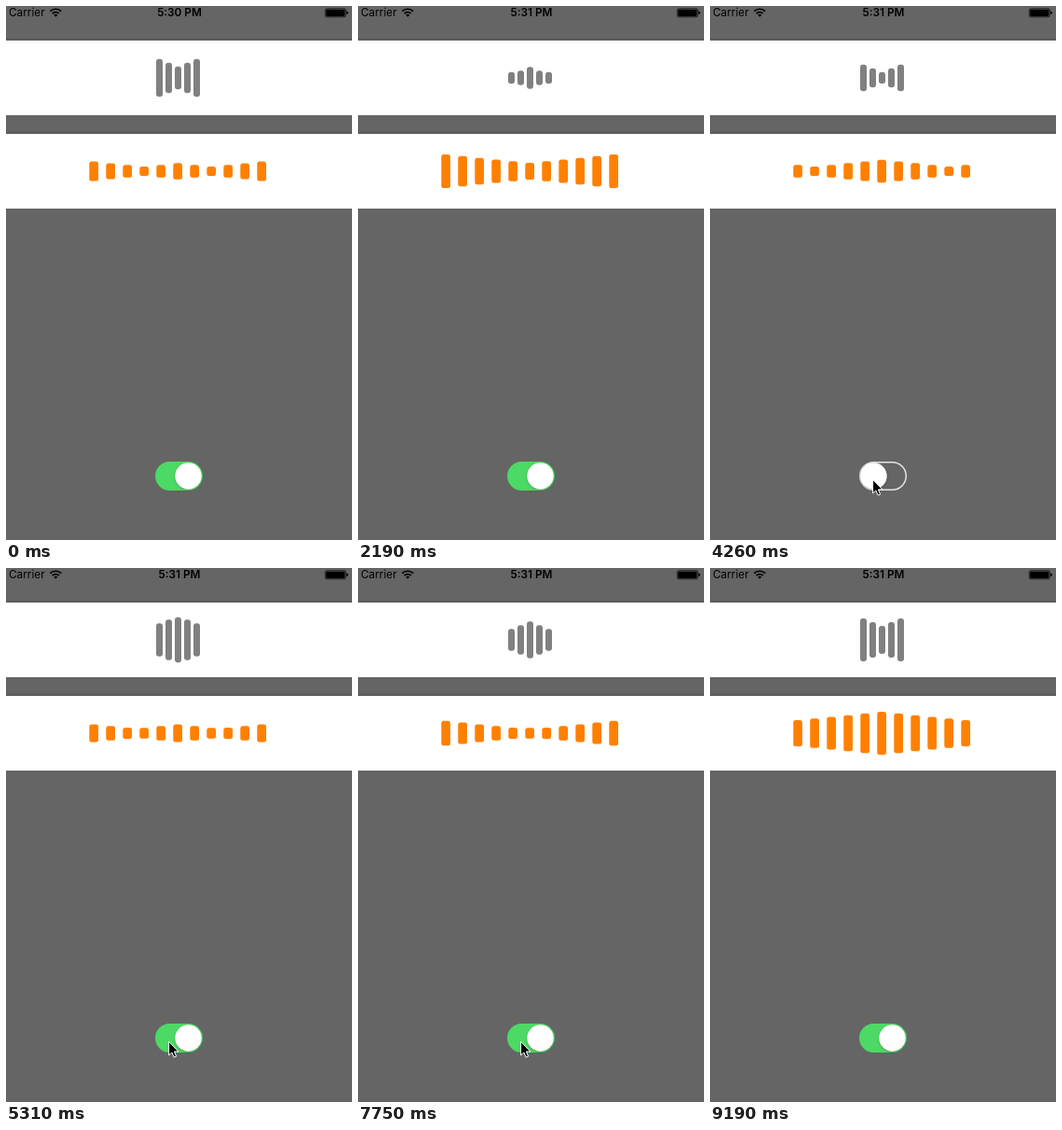
Recreate the animation shown at these times as an HTML page. Size 371 by 572 pixels, loop 9290 ms.

```html
<!DOCTYPE html>
<html lang="en">
<head>
<meta charset="utf-8">
<title>Audio bars</title>
<style>
  html, body { margin: 0; width: 100%; height: 100%; overflow: hidden; background: #656565; }
  svg { display: block; width: 371px; height: 572px; }
  text { font-family: Inter, Roboto, sans-serif; }
  #knob { filter: drop-shadow(0 1.5px 1px rgba(0, 0, 0, .22)); }
</style>
</head>
<body>
<svg viewBox="0 0 371 572" xmlns="http://www.w3.org/2000/svg">
  <defs>
    <linearGradient id="shade" x2="0" y2="1">
      <stop offset="0" stop-opacity="0"/>
      <stop offset="1" stop-opacity=".12"/>
    </linearGradient>
  </defs>
  <rect width="371" height="572" fill="#656565"/>
  <path fill="url(#shade)" d="M0 33h371v4H0z"/>
  <path fill="url(#shade)" d="M0 133h371v4H0z"/>
  <path fill="#fff" d="M0 37h371v80H0zM0 137h371v80H0z"/>

  <text x="3" y="11.3" font-size="11.8">Carrier</text>
  <text id="clock" x="186" y="11.3" font-size="11.8" font-weight="600" text-anchor="middle"></text>
  <g fill="none" stroke="#000" stroke-width="1.7">
    <path d="M47.4 5.7a8.3 8.3 0 0 1 11.8 0"/>
    <path d="M49.7 8.1a5 5 0 0 1 7.2 0"/>
  </g>
  <path d="M53.3 11.7l-2-2.1a2.9 2.9 0 0 1 4 0z"/>
  <rect x="342.3" y="2.8" width="22" height="9" rx="1.5" fill="none" stroke="#000" stroke-width=".7"/>
  <rect x="343.2" y="3.7" width="20.2" height="7.2" rx=".8"/>
  <path d="M365.2 5.6q1.6.3 1.6 1.7t-1.6 1.7z"/>

  <g id="bars"></g>

  <rect id="track" fill="none"/>
  <rect id="knob" y="489.3" height="28.4" rx="14.2" fill="#fff"/>
  <path id="cursor" d="M0 0V14.6L3.3 11.6L5.6 16.8L8 15.8L5.8 10.7H10.4Z" stroke="#fff" stroke-width="1"/>
</svg>
<script>
const LOOP = 9290;
const $ = id => document.getElementById(id);
const clamp = x => Math.min(1, Math.max(0, x));
const mix = (a, b, k) => a + (b - a) * k;
const easeOut = x => 1 - (1 - clamp(x)) ** 5;
const easeInOut = x => { x = clamp(x); return x * x * (3 - 2 * x); };

function setAttrs(el, attrs) {
  for (const name in attrs) el.setAttribute(name, attrs[name]);
}

const groups = [
  { count: 5, x: 161, gap: 10, width: 7, cy: 77, radius: 3, color: '#808080', period: 600 },
  { count: 11, x: 89.3, gap: 18, width: 9.7, cy: 177, radius: 2.5, color: '#ff8000', period: 1000 }
];
for (const g of groups) {
  g.bars = Array.from({ length: g.count }, (_, i) => {
    const bar = document.createElementNS('http://www.w3.org/2000/svg', 'rect');
    setAttrs(bar, { x: g.x + i * g.gap, width: g.width, rx: g.radius, fill: g.color });
    return $('bars').appendChild(bar);
  });
}

// Each tap: finger down, finger up, resulting switch state.
const taps = [
  { down: 2750, up: 2910, on: 0 },
  { down: 4250, up: 4422, on: 1 },
  { down: 5840, up: 5990, on: 0 },
  { down: 6740, up: 6855, on: 1 }
];

// Running time of the bars; every restart begins again from zero.
function elapsed(t) {
  if (t < 4422) return Math.min(t, 2910) + 1908;
  if (t < 6855) return Math.min(t, 5990) - 4422;
  return (Math.min(t, 9190) - 6855) * 1.092;
}

function drawBars(time) {
  for (const g of groups) {
    const middle = (g.count - 1) / 2;
    g.bars.forEach((bar, i) => {
      const phase = (time / g.period + Math.abs(i - middle) / (2 * g.count)) % 1;
      const height = 10 + 80 * Math.min(phase, 1 - phase);
      setAttrs(bar, { y: g.cy - height / 2, height });
    });
  }
}

function drawSwitch(t) {
  let on = 1, stretch = 0;
  for (const tap of taps) {
    if (t < tap.down) break;
    const released = easeOut((t - tap.up) / 420);
    on = mix(1 - tap.on, tap.on, released);
    stretch = 6.5 * easeInOut((t - tap.down) / 150) * (1 - released);
  }
  const border = mix(1.5, 15.5, on);
  const rgb = [[229, 76], [229, 217], [229, 100]].map(([off, full]) => Math.round(mix(off, full, on)));
  setAttrs($('track'), {
    x: 160 + border / 2, y: 488 + border / 2,
    width: 51 - border, height: 31 - border, rx: (31 - border) / 2,
    'stroke-width': border, stroke: `rgb(${rgb})`
  });
  setAttrs($('knob'), { x: 161.2 + on * (20.1 - stretch), width: 28.4 + stretch });
}

function drawCursor(t) {
  const enter = easeInOut((t - 2230) / 450);
  const leave = easeInOut((t - 7980) / 420);
  const x = 174.6 + 164 * (1 - enter) + 106 * leave;
  const y = 507.3 + 68 * (1 - enter) + 68 * leave;
  $('cursor').setAttribute('transform', `translate(${x} ${y})`);
}

function draw(t) {
  if (t < 6700) t -= t % 30;
  $('clock').textContent = t < 480 ? '5:30 PM' : '5:31 PM';
  drawBars(elapsed(t));
  drawSwitch(t);
  drawCursor(t);
}

const start = performance.now();
function tick() {
  draw((performance.now() - start) % LOOP);
  requestAnimationFrame(tick);
}
tick();
</script>
</body>
</html>
```
